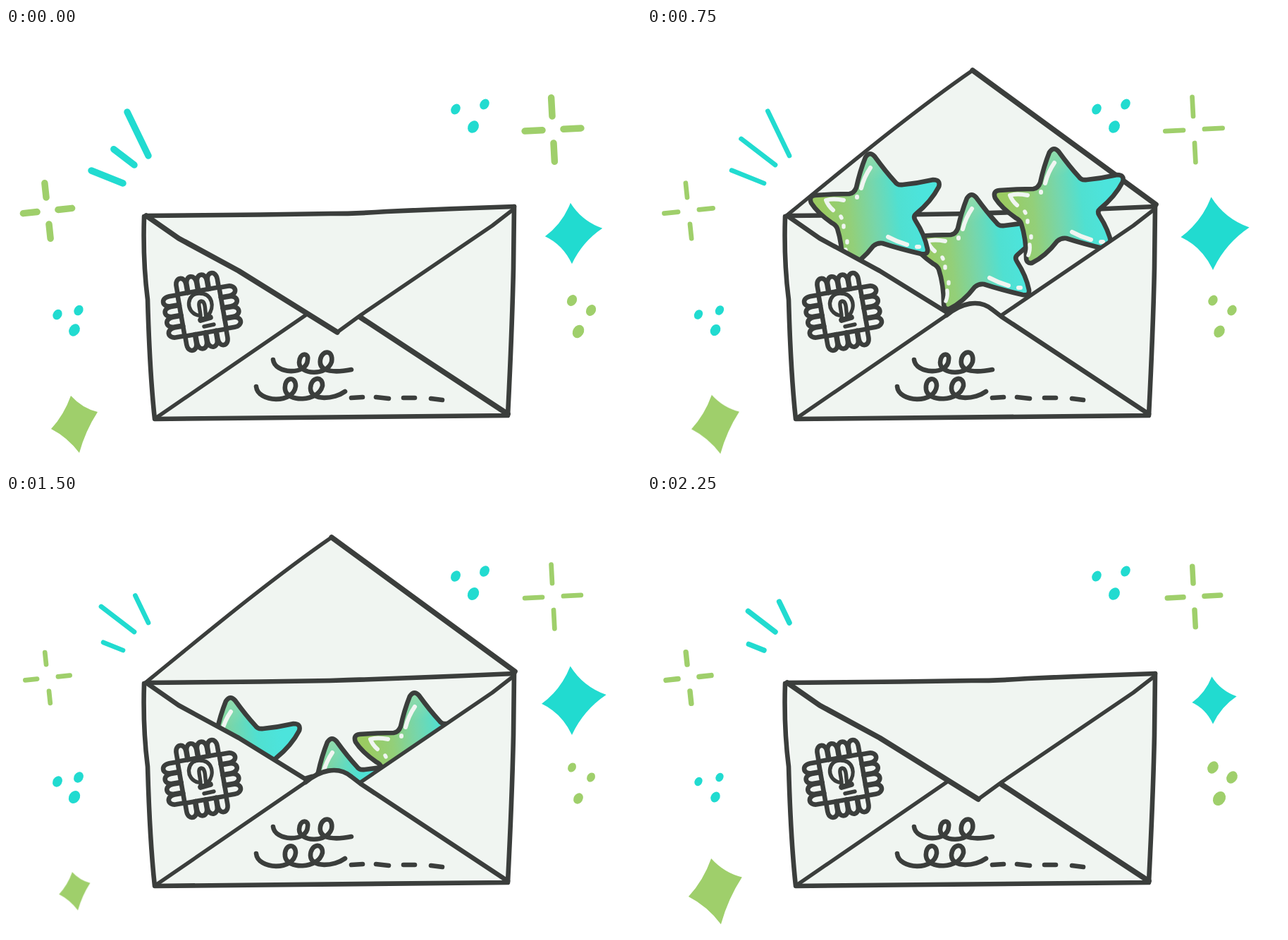
An HTML page for the animation above (2500 ms loop, 901x622 px).

```html
<!DOCTYPE html>
<html lang="en">
<head>
<meta charset="utf-8">
<title>Envelope with stars</title>
<style>
html, body { margin: 0; width: 100%; height: 100%; overflow: hidden; background: #fff; }
svg { display: block; width: 100%; height: 100%; }
.ink { fill: none; stroke: #3b3e3c; stroke-width: 6.6; stroke-linecap: round; stroke-linejoin: round; }
.paper { fill: #f0f5f1; }
.shine { fill: none; stroke: #f0f5f1; stroke-width: 6; stroke-linecap: round; stroke-linejoin: round; }
.thin { stroke-width: 5.4; }
.bold { stroke-width: 7.6; }
.cyan { fill: #21dbd0; }
.green { fill: #9fcf6b; }
.line { fill: none; stroke-linecap: round; }
.line.cyan { stroke: #21dbd0; }
.line.green { stroke: #9fcf6b; }
.pose { visibility: hidden; animation: pose 2.5s step-end infinite; }
#closed { animation: closed 2.5s step-end infinite; }
#open { animation: open 2.5s step-end infinite; }
#stars { animation: rise 2.5s step-end infinite; }
@keyframes pose { 0% { visibility: visible; } 10%, 100% { visibility: hidden; } }
@keyframes closed { 0% { visibility: visible; } 10% { visibility: hidden; } 70%, 100% { visibility: visible; } }
@keyframes open { 0% { visibility: hidden; } 10% { visibility: visible; } 70%, 100% { visibility: hidden; } }
@keyframes rise {
  0% { transform: translate(2px, 110px); }
  20% { transform: translate(2px, 43px); }
  30% { transform: translate(0, 1px); }
  40% { transform: translate(0, -16px); }
  50% { transform: translate(2px, 43px); }
  60%, 100% { transform: translate(2px, 110px); }
}
</style>
</head>
<body>
<svg viewBox="0 0 901 622" preserveAspectRatio="none">
  <defs>
    <linearGradient id="glow" gradientUnits="userSpaceOnUse" x1="512" y1="262" x2="652" y2="246">
      <stop offset="0" stop-color="#9acb62"/>
      <stop offset=".26" stop-color="#93cf79"/>
      <stop offset=".52" stop-color="#76d6ac"/>
      <stop offset=".76" stop-color="#50e0d1"/>
      <stop offset="1" stop-color="#4ce4dc"/>
    </linearGradient>
    <radialGradient id="tip" gradientUnits="userSpaceOnUse" cx="577" cy="168" r="42">
      <stop offset="0" stop-color="#93dcac"/>
      <stop offset="1" stop-color="#93dcac" stop-opacity="0"/>
    </radialGradient>
    <path id="shape" d="M571 175Q577 166 584 174Q600 196 613 210Q616 215 624 214Q645 212 667 207Q678 207 675 217Q664 238 643 255Q638 259 642 265Q655 285 659 305Q660 314 650 312Q620 305 595 297Q588 296 582 301Q566 322 546 332Q538 333 538 324Q538 298 531 276Q529 271 523 268Q503 254 494 240Q490 230 500 229Q525 227 548 227Q555 226 558 218Q563 195 571 175Z"/>
    <g id="star">
      <use href="#shape" fill="url(#glow)"/>
      <use href="#shape" fill="url(#tip)"/>
      <use href="#shape" class="ink"/>
      <path class="shine" d="M578 190Q569 203 565 219M559 231v1M540 236Q525 233 515 236Q518 244 525 250M603 288Q616 295 630 299M644 302l3 0"/>
      <path class="shine thin" d="M536 259l1 2M540 272v2M545 294v2M543 306Q544 314 541 321"/>
    </g>
    <path id="loop" d="M-7 0V-12C-7 -25 7 -25 7 -12V0"/>
  </defs>

  <g id="open">
    <path class="paper" d="M199 265L462 60L723 250L712 548L212 554Z"/>
    <path class="ink thin" d="M199 265C280 199 375 120 462 60"/>
    <path class="ink bold" d="M462 60C550 125 635 186 722 250"/>
    <path class="ink" d="M199 266Q340 265 460 263Q590 259 721 253"/>
    <g id="stars">
      <use href="#star" x="-117" y="65"/>
      <use href="#star" x="-261" y="7"/>
      <use href="#star"/>
    </g>
    <path class="paper" d="M199 266L245 298L330 344L425 403Q445 390 462 389Q483 391 503 407L690 280L721 256L712 548L212 554Z"/>
    <path class="ink" d="M199 266L245 298L330 344L424 402L434 399"/>
    <path class="ink thin" d="M721 256L690 280L503 407M212 553L425 407"/>
    <path class="ink" d="M425 407C445 390 471 383 490 399L503 409L712 547"/>
  </g>

  <g id="closed">
    <path class="paper" d="M199 266L460 263L721 253L712 548L212 554Z"/>
    <path class="ink thin" d="M212 553L425 407"/>
    <path class="ink bold" d="M503 410L712 547M199 266L245 298L330 344L470 431"/>
    <path class="ink thin" d="M470 431L503 407L690 280L721 256"/>
    <path class="ink" d="M199 266Q340 265 460 263Q500 263 540 260Q630 256 721 253"/>
  </g>

  <g class="ink">
    <path d="M196 267Q194 330 201 385Q204 490 211 554Q400 553 712 549Q718 430 720 340L721 253"/>
    <g id="stamp" transform="translate(278 402) rotate(-10)">
      <rect x="-30" y="-30" width="60" height="60"/>
    </g>
    <path class="thin" d="M272 407C254 402 256 376 274 376C294 376 296 396 287 407M276 411C277 401 270 388 277 387C284 387 282 401 284 410M281 423L295 420"/>
    <path class="bold" d="M276 414L290 410"/>
    <path d="M379 470C381 490 427 493 428 470C430 459 416 460 416 474C416 491 455 494 462 473C465 455 448 456 446 470C443 489 470 488 490 484"/>
    <path d="M355 508C357 531 409 533 411 507C411 492 394 495 396 512C398 530 443 531 449 507C450 492 432 494 432 511C433 529 466 526 481 515"/>
    <path d="M490 524L506 523M525 523L543 525M564 524L580 524M603 525L619 527"/>
  </g>
  <g id="decor"></g>
</svg>
<script>
const SLOT = 250, LOOP = 2500;

// Pose shown in each slot; a half step mixes two neighbouring poses
const poses = [1, 4, 2, 3, 0.5, 2, 4, 1, 1.5, 0];

// Size of every part in the five drawn poses
const size = {
  pen: [7.5, 9.5, 7, 6.7, 6.7],
  outerRay: [0.48, 1, 0.97, 1.02, 0.62],
  middleRay: [0.82, 0.62, 0.98, 1.03, 1],
  leftSpark: [0.87, 0.94, 0.9, 0.94, 0.86],
  rightSpark: [1.02, 1.08, 0.88, 1.1, 1.08],
  topDots: [1, 1, 1, 1, 1.03],
  leftDots: [0.9, 1.05, 0.92, 0.98, 1.1],
  rightDots: [1.08, 0.98, 1.06, 0.92, 0.82],
  cyanGem: [0.8, 1.03, 0.78, 1.23, 1.16],
  greenGem: [1.15, 1, 0.66, 1.03, 0.67]
};

function sizeAt(name, pose) {
  const list = size[name], i = Math.floor(pose), next = list[Math.ceil(pose)];
  return list[i] + (next - list[i]) * (pose - i);
}

const line = (color, width, d) =>
  `<path class="line ${color}" stroke-width="${width}" d="${d}"/>`;

// A ray grows outwards from its fixed inner end
const ray = (x, y, dx, dy, scale) => `M${x} ${y}l${dx * scale} ${dy * scale}`;

function sparkle(x, y, tilt, scale, width) {
  let d = "";
  for (let arm = 0; arm < 4; arm++) {
    const a = (arm * 90 + tilt) * Math.PI / 180, upright = arm % 2;
    const from = upright ? 19 : 15, to = (upright ? 42 : 37) * scale;
    d += `M${x + from * Math.cos(a)} ${y + from * Math.sin(a)}L${x + to * Math.cos(a)} ${y + to * Math.sin(a)}`;
  }
  return line("green", width, d);
}

const dots = (color, radius, scale, points) => points.map(([x, y], i) => {
  const r = (radius + (i === 2 ? 1.2 : 0)) * scale;
  return `<ellipse class="${color}" rx="${r * 0.9}" ry="${r * 1.13}" transform="translate(${x} ${y}) rotate(32)"/>`;
}).join("");

// Four corners joined by sides that bend towards the middle
function gem(color, x, y, scale, bend, corners) {
  let d = `M${corners[3]}`;
  corners.forEach(([px, py], i) => {
    const [qx, qy] = corners[(i + 3) % 4], k = (1 - bend) / 2;
    d += `Q${(px + qx) * k} ${(py + qy) * k} ${px} ${py}`;
  });
  return `<path class="${color}" transform="translate(${x} ${y}) scale(${scale})" d="${d}Z"/>`;
}

function drawPose(pose) {
  const s = name => sizeAt(name, pose), pen = s("pen");
  return line("cyan", pen,
      ray(202, 181, -30, -62, s("outerRay")) +
      ray(182, 194, -47, -36, s("middleRay")) +
      ray(166, 220, -45, -18, s("outerRay"))) +
    sparkle(59, 259, -6, s("leftSpark"), pen) +
    sparkle(776, 144, -3, s("rightSpark"), pen) +
    dots("cyan", 7, s("topDots"), [[638, 115], [679, 108], [663, 140]]) +
    dots("cyan", 6.5, s("leftDots"), [[73, 406], [103, 400], [97, 428]]) +
    dots("green", 7.5, s("rightDots"), [[803, 386], [830, 400], [812, 430]]) +
    gem("cyan", 803, 290, s("cyanGem"), 0.32, [[-2, -41], [42, -6], [0, 43], [-37, 5]]) +
    gem("green", 98, 561, s("greenGem"), 0.22, [[-6, -40], [32, -17], [6, 41], [-34, 7]]);
}

document.getElementById("decor").innerHTML = poses.map((pose, i) =>
  `<g class="pose" style="animation-delay:${i * SLOT - (i ? LOOP : 0)}ms">${drawPose(pose)}</g>`).join("");

let loops = "";
for (let side = 0; side < 4; side++)
  for (let k = -1.5; k < 2; k++)
    loops += `<use href="#loop" transform="rotate(${side * 90}) translate(${k * 15} -30)"/>`;
document.getElementById("stamp").innerHTML += loops;
</script>
</body>
</html>
```
